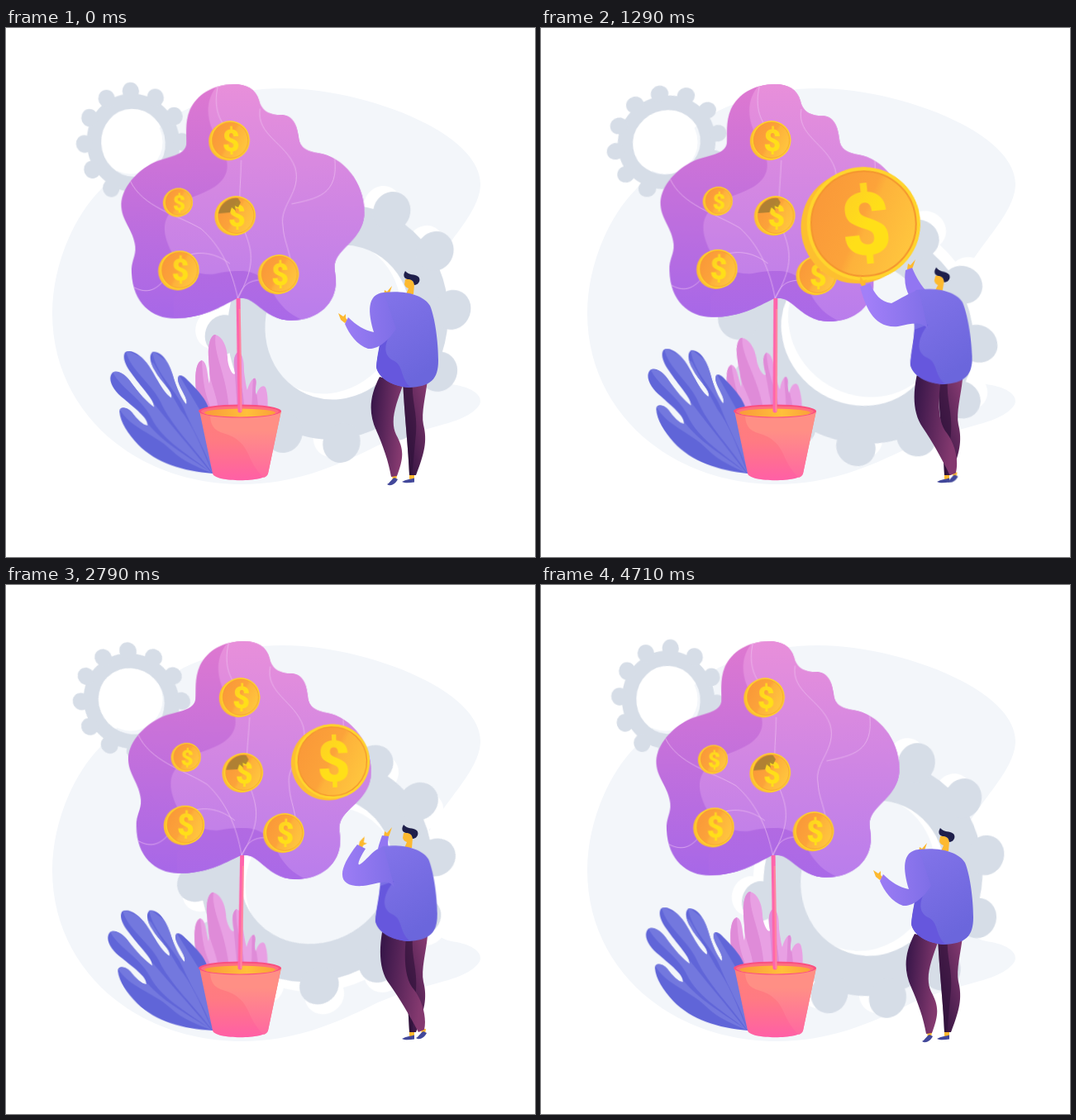
An HTML page without scripts that plays this animation: 640 px wide and 640 px high, repeating every 4.78 s.

```html
<!DOCTYPE html>
<html lang="en">
<head>
<meta charset="utf-8">
<title>Money tree</title>
<style>
html, body { margin: 0; width: 100%; height: 100%; overflow: hidden; background: #fff; }
svg { display: block; width: 100%; height: 100%; }
text { font: 900 36px Roboto, "Open Sans", sans-serif; text-anchor: middle; fill: url(#mark); }

.loop, .loop * { animation-duration: 4780ms; animation-iteration-count: infinite; animation-timing-function: ease-in-out; }

.big-gear { transform-origin: 387px 354px; animation: spin 4780ms linear infinite; }
.small-gear { transform-origin: 152.7px 139.5px; animation: spin 4780ms linear infinite reverse; }
@keyframes spin { to { transform: rotate(360deg); } }

.sway { animation: sway 2390ms cubic-bezier(.37, 0, .63, 1) infinite alternate; }
.tree { --a: 1.03deg; transform-origin: 283px 465px; }
.coins { --a: 1.17deg; transform-origin: 283px 465px; }
.blue { --a: 2.1deg; transform-origin: 250px 540px; animation-duration: 1195ms; animation-delay: -1890ms; }
.pink { --a: -3.2deg; transform-origin: 283px 465px; animation-duration: 1195ms; }
@keyframes sway {
  from { transform: rotate(calc(-1 * var(--a))); }
  to { transform: rotate(var(--a)); }
}

.coin { animation-name: coin; }
@keyframes coin {
  0%, 1.5% { transform: translate(408px, 346px) rotate(-20deg) scale(0); }
  10.4%, 12% { transform: translate(394.5px, 281px) rotate(-14deg) scale(2.92); animation-timing-function: ease-in; }
  27% { transform: translate(387.5px, 238px) rotate(-6deg) scale(2.92); animation-timing-function: ease-out; }
  38%, 48% { transform: translate(391.5px, 220px) rotate(-3deg) scale(2.92); }
  58.4% { transform: translate(393px, 214px) rotate(-2deg) scale(1.92); }
  70%, 84% { transform: translate(389px, 205px) scale(.94); }
  95%, 100% { transform: translate(385px, 205px) scale(0); }
}

.body { transform-origin: 487px 430px; animation-name: body; }
@keyframes body {
  0%, 12%, 90%, 100% { transform: none; }
  37.5%, 48% { transform: translate(-1px, -6px) rotate(-2.5deg); }
  58.4% { transform: translate(-1px, -4px) rotate(-.5deg); }
  73.2% { transform: translate(-.5px, -1px); }
}
.head { transform-origin: 489px 320px; animation-name: head; }
@keyframes head {
  0%, 12%, 90%, 100% { transform: none; }
  37.5%, 48% { transform: translate(-11px, -6px) rotate(8deg); }
  58.4% { transform: translate(-2px, -4px); }
  73.2% { transform: translate(1px, -1px); }
}
.arm { animation-name: arm; }
@keyframes arm {
  0%, 12%, 90%, 100% { d: path("M414 350C424 360 434 366 445 368C438 345 436 322 457 320L472 364C464 376 452 389 438 388C425 384 415 370 410 358Z"); }
  27% { d: path("M398 309C404 322 410 331 424 333C434 328 448 319 457 317L468 364C460 354 448 358 432 361C402 364 392 336 386 313Z"); }
  37.5%, 48% { d: path("M398 292C404 312 412 322 424 324C434 322 448 317 457 316L468 364C460 350 448 352 432 352C402 352 394 325 388 296Z"); }
  58.4% { d: path("M435 319C428 330 424 340 428 338C437 333 445 318 457 317L470 366C462 354 450 362 432 364C402 366 398 348 425 314Z"); }
  73.2% { d: path("M415 342C424 352 432 357 436 359C434 340 438 321 457 319L472 362C462 370 450 386 433 385C422 380 414 360 409 347Z"); }
}
.hand { transform-origin: 412px 354px; animation-name: hand; }
@keyframes hand {
  0%, 12%, 90%, 100% { transform: none; }
  27% { transform: translate(-20px, -42px) rotate(22deg); }
  37.5%, 48% { transform: translate(-19px, -59px) rotate(25deg); }
  58.4% { transform: translate(18px, -37px) rotate(65deg); }
  73.2% { transform: translate(0, -9px) rotate(14deg); }
}
.far-arm { animation-name: far-arm; }
@keyframes far-arm {
  0%, 12%, 80%, 100% { d: path("M456 323C456 323 457 324 458 325L470 325C466 323 464 323 462 322Z"); }
  27% { d: path("M441 293C439 306 441 316 446 325L468 320C460 312 454 302 449 290Z"); }
  37.5%, 48% { d: path("M437 281C435 300 438 315 445 322L470 320C458 308 450 295 444 279Z"); }
  58.4% { d: path("M455 303C453 309 451 314 450 319L465 321C461 316 462 310 463 304Z"); }
}
.far-hand { animation-name: far-hand; }
@keyframes far-hand {
  0%, 12%, 90%, 100% { transform: translate(459px, 324px); }
  27% { transform: translate(445px, 292px); }
  37.5%, 48% { transform: translate(441px, 282px); }
  58.4% { transform: translate(459px, 305px); }
  73.2% { transform: translate(456px, 320px); }
}
.leg { animation-name: leg; }
@keyframes leg {
  0%, 12%, 95%, 100% { d: path("M452 422C440 445 438 465 448 487C456 505 463 525 466 543L473 542C481 520 482 510 472 492C464 475 472 455 481 430Z"); }
  32%, 60.7% { d: path("M455 420C451 445 452 467 464 483C476 500 488 520 499 541L506 538C509 525 505 505 494 490C483 478 481 455 484 426Z"); }
}
.foot { animation-name: foot; }
@keyframes foot {
  0%, 12%, 95%, 100% { transform: none; }
  32%, 60.7% { transform: translate(35px, -4px); }
}
</style>
</head>
<body>
<svg viewBox="0 0 640 640">
<defs>
  <linearGradient id="leafDark" x2="0" y2="1"><stop stop-color="#de78d0"/><stop offset="1" stop-color="#a667e8"/></linearGradient>
  <linearGradient id="leafLight" gradientUnits="userSpaceOnUse" x1="0" x2="0" y1="68" y2="355"><stop stop-color="#e88fda"/><stop offset="1" stop-color="#b97dec"/></linearGradient>
  <linearGradient id="leafLow" x2="0" y2="1"><stop stop-color="#b26ae2"/><stop offset="1" stop-color="#a969e8"/></linearGradient>
  <linearGradient id="potFill" x2="0" y2="1"><stop stop-color="#ff8078"/><stop offset=".45" stop-color="#ff7a83"/><stop offset="1" stop-color="#ff5fa6"/></linearGradient>
  <linearGradient id="potLight" x2="0" y2="1"><stop offset=".3" stop-color="#ff8f85"/><stop offset="1" stop-color="#ff68a2"/></linearGradient>
  <linearGradient id="soil"><stop stop-color="#f99a3a"/><stop offset=".6" stop-color="#ffc03a"/><stop offset="1" stop-color="#faa03a"/></linearGradient>
  <linearGradient id="gold" x1=".1" y1=".25" x2="1" y2=".75"><stop stop-color="#fa9a39"/><stop offset=".42" stop-color="#fca33a"/><stop offset=".5" stop-color="#fdb23b"/><stop offset="1" stop-color="#ffc83e"/></linearGradient>
  <linearGradient id="mark" x2=".6" y2="1"><stop stop-color="#fdc92a"/><stop offset=".6" stop-color="#ffdf18"/></linearGradient>
  <linearGradient id="shirt" x2=".4" y2="1"><stop stop-color="#8474ea"/><stop offset="1" stop-color="#6b66dc"/></linearGradient>
  <linearGradient id="sleeve" gradientUnits="userSpaceOnUse" x1="395" x2="474" y1="0" y2="0"><stop stop-color="#a27ff8"/><stop offset="1" stop-color="#7d6ee6"/></linearGradient>
  <linearGradient id="trouser" x2="1" y2=".25"><stop offset=".1" stop-color="#3a174a"/><stop offset="1" stop-color="#84396f"/></linearGradient>
  <linearGradient id="trouserBack" x1="1" x2=".2" y2="1"><stop stop-color="#8a3c74"/><stop offset="1" stop-color="#321340"/></linearGradient>

  <!-- Round zero-length dashes form the cog teeth; the wheel is slightly oval -->
  <g id="cog" fill="none" transform="rotate(25) scale(.93 1.02) rotate(-29)">
    <circle r="117" stroke-width="48"/>
    <circle r="146" stroke-width="48" stroke-linecap="round" pathLength="12" stroke-dasharray="0 1"/>
  </g>
  <g id="money">
    <path d="M-1.7 .8L1 -.3" stroke="#fdbf30" stroke-width="46.8" stroke-linecap="round"/>
    <circle cx="1" cy="-.3" r="23.5" fill="#ffd42d"/>
    <circle cx="1" cy="-.3" r="21.7" fill="url(#gold)" stroke="#f4952f" stroke-width=".7"/>
    <text x="1.8" y="12.6">$</text>
  </g>
  <path id="canopy" d="M283 68C256 68 238 80 229 98C222 114 225 130 224 140C221 155 196 154 180 163C160 174 143 194 144 214C145 232 158 242 160 262C161 274 154 280 155 294C156 330 178 350 207 350C240 350 262 337 280 328C288 325 296 327 304 334C318 346 330 355 348 355C380 355 402 335 402 308C402 298 399 292 402 284C409 266 438 256 438 224C438 190 414 158 383 153C366 150 361 144 360 133C358 116 352 106 338 106C322 106 315 98 313 88C309 74 298 68 283 68Z"/>
  <clipPath id="inCanopy"><use href="#canopy"/></clipPath>
  <path id="blueLeaf" d="M250 539C215 536 182 526 160 503C148 490 139 476 138 463C138 456 147 457 153 464C159 472 166 480 172 480C172 470 156 459 144 448C132 439 125 427 128 419C131 411 142 414 151 426C161 440 172 453 180 458C181 450 163 432 153 417C144 405 142 395 146 391C154 387 166 396 174 408C184 424 192 442 201 447C204 440 189 428 182 415C175 404 174 395 179 391C190 390 199 405 203 420C207 435 214 450 219 455C222 448 210 435 209 425C209 417 215 419 222 427C235 440 243 450 246 460L256 540Z"/>
  <clipPath id="inBlue"><use href="#blueLeaf"/></clipPath>
  <path id="pinkLeaf" d="M235 464C228 440 226 405 237 402C244 405 243 418 246 430C248 420 244 400 245 388C246 376 250 371 253 371C262 373 267 385 268 398C268 410 275 422 277 418C274 405 276 394 281 392C287 394 288 405 288 416C290 430 291 436 292 438C295 426 301 421 302 425C304 430 300 438 303 444C306 432 314 430 315 438C317 446 317 455 316 464Z"/>
  <clipPath id="inPink"><use href="#pinkLeaf"/></clipPath>
</defs>

<path fill="#f3f6fa" d="M335 73C430 73 575 125 574 190C572 235 505 280 503 330C500 400 510 428 545 432C570 437 578 448 572 457C555 480 510 480 450 505C400 530 350 552 285 552C158 552 56 466 56 345C56 290 80 230 115 195C145 160 180 120 215 100C250 83 290 73 335 73Z"/>

<circle cx="151" cy="138" r="38.5" fill="#fff"/>
<g class="small-gear" fill="none" stroke="#d6dde7">
  <g transform="translate(154 139) rotate(165) scale(.965 1.03) rotate(-167)">
    <circle r="49" stroke-width="18"/>
    <circle r="61" stroke-width="21" stroke-linecap="round" pathLength="12" stroke-dasharray="0 1"/>
  </g>
</g>

<g class="big-gear">
  <use href="#cog" x="390" y="349" stroke="#fff"/>
  <use href="#cog" x="401.500" y="356" stroke="#d6dde7"/>
</g>

<g class="sway pink">
  <g transform="rotate(-3.2 283 465)">
    <use href="#pinkLeaf" fill="#e8a0e3"/>
    <path clip-path="url(#inPink)" fill="#df8bd8" d="M225 395L237 402C238 425 240 445 250 464H225ZM240 370H254C249 392 268 420 270 464H257C256 440 240 420 240 370ZM275 390H281C278 420 290 440 288 464H280ZM299 420L304 425C300 440 307 450 304 464H297Z"/>
  </g>
</g>
<g class="sway blue">
  <use href="#blueLeaf" fill="#6065d8"/>
  <path clip-path="url(#inBlue)" fill="#7378de" d="M146 388C150 412 178 430 188 452C200 480 230 510 250 539C236 505 226 480 212 462L180 405ZM178 389C182 418 206 436 216 460C228 490 244 515 250 539L240 470L205 410ZM130 414C138 434 164 446 176 470C190 500 225 518 248 538C222 505 200 480 184 459L150 418ZM138 460C152 484 180 490 200 510C215 525 235 532 250 539C215 515 190 500 174 480L150 457Z"/>
</g>

<g>
  <path fill="url(#potFill)" d="M234 463L250 539C252 550 315 550 317 539L333 463Z"/>
  <path fill="url(#potLight)" d="M247 470C249 495 268 486 282 500C296 512 293 526 312 544C315 543 316 541 317 539L333 463Z"/>
  <ellipse cx="283" cy="463.5" rx="50" ry="8" fill="#fa4f80"/>
  <ellipse cx="283" cy="464" rx="47" ry="6.5" fill="#ff6f80"/>
  <ellipse cx="283" cy="465.5" rx="43" ry="5" fill="url(#soil)"/>
</g>

<g class="sway tree">
  <use href="#canopy" fill="url(#leafDark)"/>
  <g clip-path="url(#inCanopy)">
    <path fill="url(#leafLight)" d="M266 66C246 85 248 112 262 135C280 165 278 186 240 200C205 212 190 228 198 255C208 290 235 300 262 297C300 290 318 300 325 320C335 340 350 352 368 358L450 350V66Z"/>
    <path fill="url(#leafLow)" d="M205 325C225 300 262 293 290 294C312 296 320 312 326 322C335 342 350 350 368 358H205Z"/>
    <g fill="none" stroke="#f0c3f2" stroke-opacity=".65">
      <path d="M283 327C276 290 262 262 240 242C210 224 170 215 155 182M283 327C304 290 302 272 294 250C284 220 288 205 290 160M155 310C190 332 200 285 220 275C238 268 258 272 274 285M283 327C292 305 300 306 322 304"/>
      <path d="M264 68C258 90 262 108 272 120M314 98C308 130 345 140 355 170C363 200 335 215 339 240C340 258 345 265 348 285M403 158C408 205 380 208 350 214"/>
    </g>
  </g>
  <path fill="#ff64ab" d="M281 327H286L285.5 464Q283 467 280.5 464Z"/>
  <path fill="#ff8a9c" d="M284 340H285.8L285.3 464H283.5Z"/>
</g>

<g class="sway coins">
  <use href="#money" x="277" y="136"/>
  <use href="#money" transform="translate(213.3 209.5) scale(.73)"/>
  <use href="#money" x="282.3" y="227"/>
  <path fill="#a57c32" fill-opacity=".88" d="M262 224A21.7 21.7 0 0 1 286 206L289 211L286 217L282 215L283 221L278 217L276 223Z"/>
  <use href="#money" x="212.7" y="291.7"/>
  <use href="#money" x="333.2" y="299"/>
</g>

<g class="loop">
  <use class="coin" href="#money"/>

  <path fill="#fdb92f" d="M488 540H494V547H488Z"/>
  <path fill="#42489a" d="M479 549C484 546 489 546 494 544.5L494 549.5C489 550 483 551 479 549Z"/>
  <path fill="url(#trouserBack)" d="M480 425C482 470 487 510 488 541L496 541C506 515 510 500 505 480C502 465 508 445 510 425Z"/>
  <path fill="#2c1038" fill-opacity=".6" d="M480 425H492C490 450 498 465 496 490C494 510 493 525 491 541H488C487 510 482 470 480 425Z"/>
  <g class="foot">
    <path fill="#fdb92f" d="M467 541H473L472 547H468Z"/>
    <path fill="#42489a" d="M461 552C465 550 466 546 470 544L474 546C471 552 465 555 461 552Z"/>
  </g>
  <path class="leg" fill="url(#trouser)"/>

  <g class="far-hand"><path fill="#fdb92f" d="M-2 0L-1 -7L2 -5L8 -12L5 -3L3 1Z"/></g>
  <path class="far-arm" fill="#9276f2"/>
  <g class="head">
    <path fill="#fdb92f" d="M483 304L482 310Q483 314 487 315L484 322H493L494 310C492 303 486 303 483 304Z"/>
    <path fill="#1f1f4b" d="M483 294C480 299 481 303 486 304C491 304 493 306 494 311C500 311 502 304 499 301C494 297 488 300 483 294Z"/>
  </g>
  <g class="body">
    <path fill="url(#shirt)" d="M457 320C480 317 505 322 513 336C519 350 523 380 523 402C523 425 514 434 487 435C465 433 450 422 448 410C450 390 458 370 452 345Z"/>
    <path fill="#6657dd" d="M471 362C456 380 456 396 468 402C482 408 476 424 490 435C465 434 450 422 448 410C449 395 453 382 454 368Z"/>
  </g>
  <path class="hand" fill="#fdb92f" d="M414 354L410 357L405 353L402 345L408 349L411 346L411 351Z"/>
  <path class="arm" fill="url(#sleeve)"/>
</g>
</svg>
</body>
</html>
```
